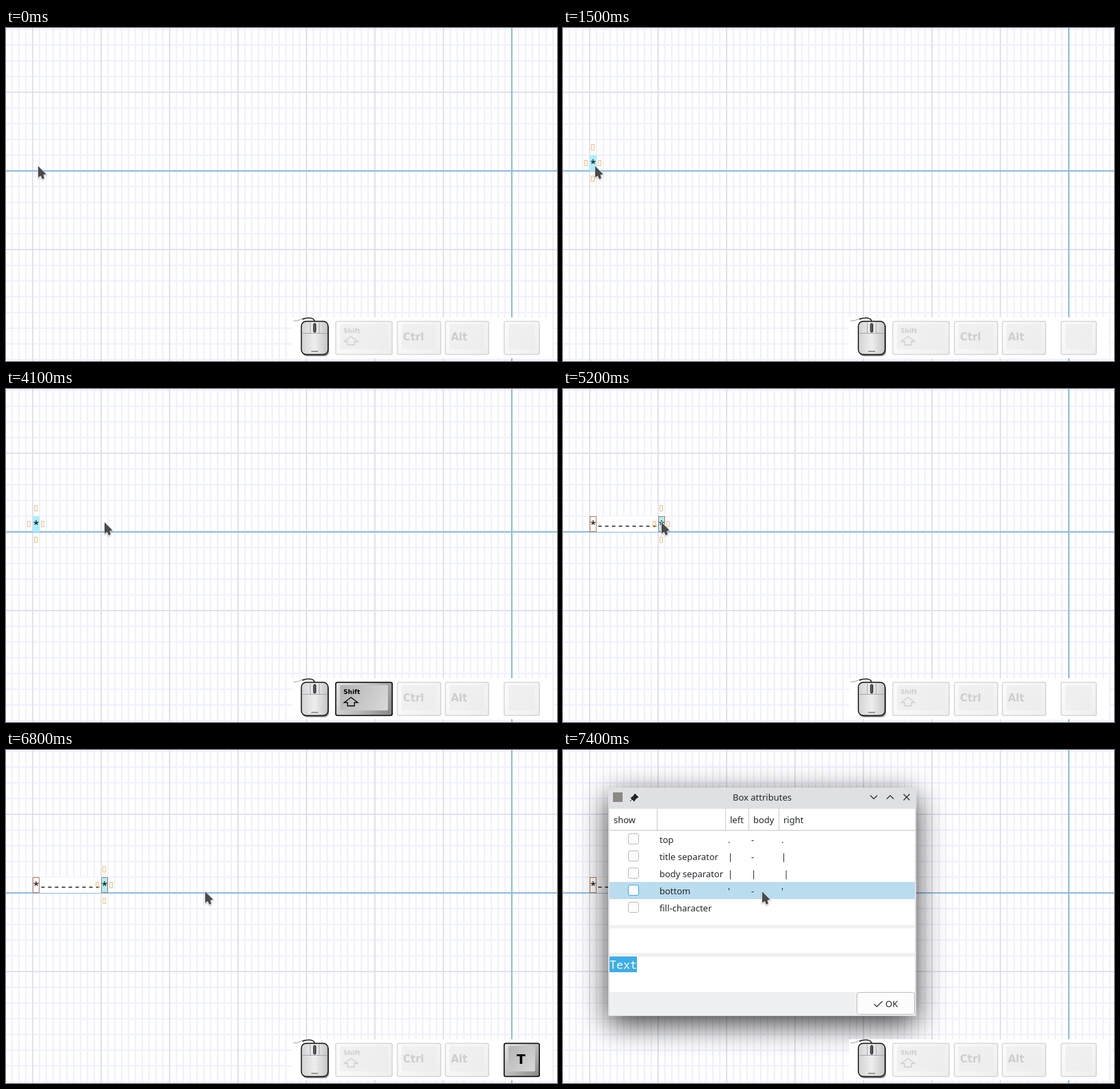
Write an HTML page with a canvas that moves like this. It is 805 by 487 pixels and loops after 8 s.

```html
<!DOCTYPE html>
<html lang="en">
<head>
<meta charset="utf-8">
<title>Grid editor</title>
<style>
html, body { margin: 0; width: 100%; height: 100%; overflow: hidden; background: #fff; }
canvas { display: block; }
</style>
</head>
<body>
<canvas id="stage" width="805" height="487"></canvas>
<script>
const W = 805, H = 487, LOOP = 8000, STEP = 100;
const CELL_W = 10, CELL_H = 23, ROW_Y = 186, FIRST_X = 39, SECOND_X = 139;
const MONO = '16.67px "Noto Sans Mono", monospace';
const SANS = '13px "Noto Sans", sans-serif';
const keycap = size => `bold ${size}px "DejaVu Sans", sans-serif`;
const INK = '#232629', PALE = '#eff0f1', BLUE = '#3daee9';
const ctx = document.getElementById('stage').getContext('2d', { alpha: false });

const POINTER_START = { x: 47, y: 202 };
const POINTER_MOVES = [
  { from: 1700, to: 2400, x: 156, y: 198 },
  { from: 2400, to: 2600, x: 145, y: 198 },
  { from: 2600, to: 2900, x: 144, y: 195 },
  { from: 5500, to: 5800, x: 291, y: 207 }
];

const within = (t, from, to) => t >= from && t < to;
const smooth = k => k * k * (3 - 2 * k);

function rect(x, y, w, h, fill) {
  ctx.fillStyle = fill;
  ctx.fillRect(x, y, w, h);
}

function text(string, x, y, font = SANS, color = INK, align = 'left') {
  ctx.font = font;
  ctx.fillStyle = color;
  ctx.textAlign = align;
  ctx.fillText(string, x, y);
}

// Draws an SVG path placed at (x, y).
function shape(path, x, y, { fill, line, width = 1.2 }) {
  const p = new Path2D(path);
  ctx.save();
  ctx.translate(x, y);
  if (line) {
    ctx.strokeStyle = line;
    ctx.lineWidth = width;
    ctx.stroke(p);
  }
  if (fill) {
    ctx.fillStyle = fill;
    ctx.fill(p);
  }
  ctx.restore();
}

function roundBox(x, y, w, h, radius, fill, border, width = 1) {
  ctx.beginPath();
  ctx.roundRect(x, y, w, h, radius);
  ctx.fillStyle = fill;
  ctx.fill();
  if (!border) return;
  ctx.strokeStyle = border;
  ctx.lineWidth = width;
  ctx.stroke();
}

function gradient(x0, y0, x1, y1, ...colors) {
  const g = ctx.createLinearGradient(x0, y0, x1, y1);
  colors.forEach((c, i) => g.addColorStop(i / (colors.length - 1), c));
  return g;
}

function drawGrid() {
  const lines = (stepX, stepY, x0, y0, color) => {
    for (let x = x0; x < W; x += stepX) rect(x - 1, 0, 2, H, color);
    for (let y = y0; y < H; y += stepY) rect(0, y - 1, W, 2, color);
  };
  rect(0, 0, W, H, '#fff');
  lines(CELL_W, CELL_H, 9, 2, '#eff0ff');
  lines(10 * CELL_W, 10 * CELL_H, 39, 94, '#e0e0ee');
  lines(W, H, 739, 209, '#8abae6');
}

function drawCells(string, x, fill, outlined) {
  rect(x, ROW_Y, string.length * CELL_W, CELL_H, fill);
  if (outlined) {
    ctx.strokeStyle = '#b5795a';
    ctx.lineWidth = 1;
    ctx.strokeRect(x + .5, ROW_Y + .5, CELL_W - 1, CELL_H - 1);
  }
  text(string, x, ROW_Y + 19, MONO, '#000');
}

function drawMarkers(x) {
  ctx.strokeStyle = '#f0c482';
  ctx.lineWidth = 1;
  for (let i = 0; i < 4; i++) {
    const dx = Math.round(Math.cos(i * Math.PI / 2)) * CELL_W;
    const dy = Math.round(Math.sin(i * Math.PI / 2)) * CELL_H;
    ctx.strokeRect(x + dx + 2.5, ROW_Y + dy + 7.5, 4, 8);
  }
}

function drawDrawing(t) {
  if (t < 700) return;
  const connected = t >= 4400;
  if (connected) {
    drawCells('-'.repeat(9), FIRST_X + CELL_W, '#fff');
    drawCells('*', FIRST_X, '#fff', true);
  }
  const selectedX = connected ? SECOND_X : FIRST_X;
  drawCells('*', selectedX, '#aaf0ff', connected);
  drawMarkers(selectedX);
}

function drawTitleBar() {
  rect(73, 62, 14, 14, '#8c8883');
  text('Box attributes', 291, 74, SANS, INK, 'center');
  shape('M1-5 6 0 4 1 1 4 0 6-5 1-3 0 0-3ZM-2 2-6 6', 104, 69, { fill: INK, line: INK, width: 1 });
  shape('M-5-2.5 0 2.5 5-2.5', 454, 69, { line: INK });
  shape('M-5 2.5 0-2.5 5 2.5', 478, 69, { line: INK });
  shape('M-4.5-4.5 4.5 4.5M4.5-4.5-4.5 4.5', 502, 69, { line: INK });
}

function drawTable() {
  const columns = { left: 237, body: 271, right: 315 };
  rect(68, 86, 446, 268, '#fff');
  rect(68, 117, 446, 1, '#c4c6c8');
  rect(137, 86, 1, 31, '#c9cbcd');
  text('show', 74, 107);
  for (const [name, x] of Object.entries(columns)) {
    rect(x, 86, 1, 31, '#c9cbcd');
    text(name, x + 7, 107);
  }

  const rows = {
    'top': ['.', '-', '.'],
    'title separator': ['|', '-', '|'],
    'body separator': ['|', '|', ' |'],
    'bottom': ["'", '-', "'"],
    'fill-character': []
  };
  Object.entries(rows).forEach(([label, marks], i) => {
    const y = 118 + 25 * i, selected = label === 'bottom';
    if (selected) rect(68, y, 446, 25, '#b9dcee');
    roundBox(95.5, y + 4.5, 15, 15, 2.5, '#fcfcfc', selected ? BLUE : '#b9bbbd');
    text(label, 141, y + 18);
    marks.forEach((mark, col) => text(mark, Object.values(columns)[col] + 4, y + 18));
  });
}

function drawDialog() {
  ctx.save();
  ctx.shadowColor = 'rgba(0,0,0,.76)';
  ctx.shadowBlur = 44;
  ctx.shadowOffsetY = 12;
  roundBox(66, 55, 450, 334, [4, 4, 0, 0], '#dee0e2');
  ctx.restore();
  drawTitleBar();
  drawTable();

  rect(68, 256, 446, 5, PALE);
  rect(68, 297, 446, 5, PALE);
  rect(68, 354, 446, 34, PALE);
  rect(68, 302, 40, 23, BLUE);
  text('Text', 68, 320, MONO, '#fff');

  roundBox(429.5, 354.5, 84, 32, 3, '#fcfcfc', '#bcbec0');
  shape('M0 4 4 8 12 0', 454.5, 367.5, { line: INK });
  text('OK', 471, 376);
}

function drawMouse() {
  shape('M0 4C9 6 10 0 18 0', 420, 424, { line: '#aaa' });
  shape('M0 2C8-1 18-1 18 6', 433, 424, { line: '#222', width: 1.4 });
  roundBox(433, 431, 39, 49, 7, 'rgba(0,0,0,.45)');
  roundBox(431.5, 429, 39, 48.5, 7, gradient(431, 0, 471, 0, '#d2d2d2', '#eeeeee', '#c4c4c4'), '#111', 1.5);
  rect(433, 446, 36, 1, '#a5a5a5');
  for (const x of [444, 457]) rect(x, 431, 1, 15, '#aaa');
  roundBox(449.3, 432, 3.4, 13, 2, '#596070', '#111');
  rect(446, 472, 10, 2, '#999');
}

function drawKey(x, w, pressed, drawLabel) {
  const y = 428;
  ctx.save();
  ctx.globalAlpha = pressed ? 1 : .14;
  roundBox(x + .75, y + 1, w - 1.5, 48.5, 2.5,
    gradient(x, y, x + w, y + 50, '#e6e6e6', '#bdbdbd', '#858585'), '#000', 1.5);
  roundBox(x + 7, y + 5, w - 14, 37, 2,
    gradient(x + 7, y + 5, x + w - 7, y + 42, '#b4b4b4', '#d9d9d9'));
  drawLabel();
  ctx.restore();
}

function drawKeyPanel(t) {
  rect(418, 423, 380, 60, '#fff');
  drawMouse();
  const shift = within(t, 500, 1500) || within(t, 4100, 5200);
  const star = within(t, 700, 1300) || within(t, 4400, 5000);
  const letter = star ? '*' : within(t, 6500, 7400) ? 'T' : '';

  drawKey(481, 84, shift, () => {
    text('Shift', 493, 446, keycap(9), '#000');
    shape('M0 0 10 7.5H5V12.5H-5V7.5H-10Z', 504, 451, { line: '#000', width: 1.3 });
  });
  ['Ctrl', 'Alt'].forEach((word, i) => {
    const x = 571 + 70 * i;
    drawKey(x, 65, false, () => text(word, x + 9, 457, keycap(15), '#000'));
  });
  drawKey(727, 53, letter !== '', () => text(letter, 752.5, 459, keycap(19), '#000', 'center'));
}

function pointerAt(t) {
  const stepped = Math.floor(t / STEP) * STEP;
  let { x, y } = POINTER_START;
  for (const move of POINTER_MOVES) {
    const k = Math.min(1, Math.max(0, (stepped - move.from) / (move.to - move.from)));
    x += (move.x - x) * smooth(k);
    y += (move.y - y) * smooth(k);
  }
  return [Math.round(x), Math.round(y)];
}

function drawPointer(t) {
  const [x, y] = pointerAt(t);
  const arrow = 'M0 0V16.5L3.8 14 6 19 9 17.5 7.5 13 11.5 11.5Z';
  ctx.save();
  ctx.shadowColor = 'rgba(0,0,0,.3)';
  ctx.shadowBlur = 2;
  ctx.shadowOffsetY = 1;
  shape(arrow, x, y, { line: '#f4f4f4', width: 1.5 });
  ctx.restore();
  shape(arrow, x, y, { fill: '#4a4a4a' });
}

function render(t) {
  drawGrid();
  drawDrawing(t);
  if (t >= 6900) drawDialog();
  drawKeyPanel(t);
  drawPointer(t);
}

const start = performance.now();
function tick() {
  render((performance.now() - start) % LOOP);
  requestAnimationFrame(tick);
}
tick();
</script>
</body>
</html>
```
